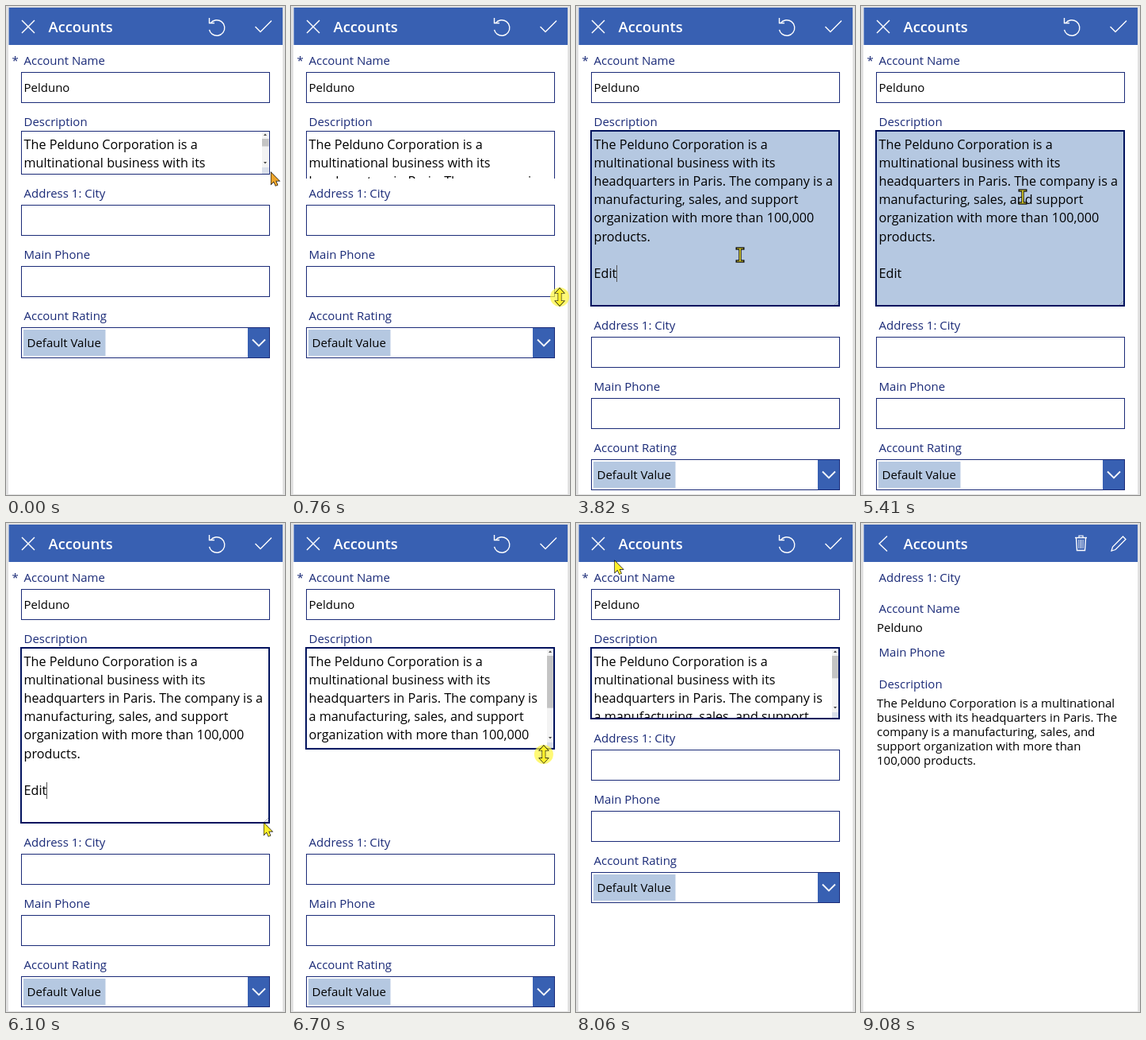
Write an HTML page with a canvas that moves like this. It is 352 by 615 pixels and loops after 9560 ms.

```html
<!DOCTYPE html>
<html lang="en">
<head>
<meta charset="utf-8">
<title>Account form</title>
<style>
  html, body { margin: 0; width: 100%; height: 100%; overflow: hidden; background: #fff; }
  canvas { display: block; }
</style>
</head>
<body>
<canvas id="stage" width="352" height="615"></canvas>
<script>
const g = document.getElementById('stage').getContext('2d');
const LOOP = 9560;
const FONT = '"Open Sans", "Noto Sans", sans-serif';
const BLUE = '#3860b2', NAVY = '#1b2b78', DEEP = '#02135e', PALE = '#b5c8e1', EDGE = '#e1e1e1';
const COMPANY = 'Pelduno';
const ABOUT = `The ${COMPANY} Corporation is a multinational business with its headquarters in Paris. ` +
  'The company is a manufacturing, sales, and support organization with more than 100,000 products.';
const EDIT_SIZE = 16.2, PITCH = 23.1, TOP = 157;

// Moments when the form changes state
const AT = { grow: 200, grown: 1090, focus: 1450, end: 1900, enter1: 2560, enter2: 3170,
  type: 3430, shrink: 6250, shrunk: 7000, relayout: 7180, press: 8200, view: 8400, move: 8730, gone: 9080 };

// Pointer path: time, x, y
const PATH = [
  [70, 334, 209], [200, 337, 210], [760, 339, 366], [1020, 339, 374], [1090, 339, 374],
  [1450, 245, 268], [1550, 245, 268], [1700, 225, 293], [1880, 207, 313], [4400, 207, 313],
  [4550, 204, 240], [5430, 204, 240], [5850, 325, 377], [6180, 325, 377], [6250, 326, 384],
  [6950, 316, 253], [7050, 316, 244], [7640, 316, 244], [8150, 25, 30], [8730, 25, 30],
  [8800, 62, 45], [9010, 293, 510], [9080, 340, 585]
];

const clamp = (v, lo, hi) => Math.min(hi, Math.max(lo, v));
const between = (t, a, b) => t >= a && t < b;

function pointerAt(t) {
  const i = PATH.findIndex(k => k[0] > t);
  if (i === 0) return PATH[0].slice(1);
  if (i < 0) return PATH[PATH.length - 1].slice(1);
  const [t0, x0, y0] = PATH[i - 1], [t1, x1, y1] = PATH[i];
  const u = (t - t0) / (t1 - t0), e = u * u * (3 - 2 * u);
  return [x0 + (x1 - x0) * e, y0 + (y1 - y0) * e];
}

function rect(x, y, w, h, color) {
  g.fillStyle = color;
  g.fillRect(x, y, w, h);
}

function line(points, color, width = 1.4, close = false) {
  g.beginPath();
  points.forEach(([x, y]) => g.lineTo(x, y));
  if (close) g.closePath();
  g.strokeStyle = color;
  g.lineWidth = width;
  g.stroke();
}

function outline(x, y, w, h, color, width) {
  g.strokeStyle = color;
  g.lineWidth = width;
  g.strokeRect(x + width / 2, y + width / 2, w - width, h - width);
}

function shape(points, fill) {
  line(points, '#000', 1.2, true);
  g.fillStyle = fill;
  g.fill();
}

function setFont(size, weight = 400) {
  g.font = `${weight} ${size}px ${FONT}`;
}

function text(str, x, y, color = '#000', size = 15, weight = 400) {
  setFont(size, weight);
  g.fillStyle = color;
  g.fillText(str, x, y);
}

const label = (str, y) => text(str, 22.5, y, NAVY);
const rowOffset = i => Math.round(i * PITCH);

function wrap(str, width, size) {
  setFont(size);
  const rows = [];
  for (const para of str.split('\n')) {
    let row = '';
    for (const word of para.split(' ')) {
      const next = row ? row + ' ' + word : word;
      if (row && g.measureText(next).width > width) {
        rows.push(row);
        row = word;
      } else row = next;
    }
    rows.push(row);
  }
  return rows;
}

const field = y => outline(19, y, 314, 39, NAVY, 1);

function frame() {
  rect(0, 0, 352, 615, EDGE);
  rect(3, 2, 346, 612, '#fff');
  rect(3.5, 2, 345.5, 47, BLUE);
  text('Accounts', 53.5, 32.5, '#fff', 18.4, 600);
}

function editIcons() {
  line([[20, 18], [36, 34]], '#fff');
  line([[36, 18], [20, 34]], '#fff');
  g.beginPath();
  g.arc(266, 27.5, 9.8, -2.5, 2.9);
  g.strokeStyle = '#fff';
  g.stroke();
  line([[256.5, 15], [256.5, 21.5], [263, 21.5]], '#fff');
  line([[314.5, 26], [321, 32.5], [335, 18.5]], '#fff');
}

function viewIcons() {
  line([[33, 16.5], [23, 26], [33, 35.5]], '#fff');
  line([[270, 18.5], [285, 18.5]], '#fff');
  line([[275, 18], [275, 16], [280, 16], [280, 18]], '#fff', 1.2);
  line([[271.5, 19], [272.5, 34.5], [282.5, 34.5], [283.5, 19]], '#fff');
  for (const x of [275, 277.5, 280]) line([[x, 21], [x, 32]], '#fff', 1);
  line([[316, 35], [317.5, 30], [330.5, 17], [334, 20.5], [321, 33.5]], '#fff', 1.3, true);
}

function scrollbar(bottom, ratio) {
  const track = bottom - 20 - 167;
  rect(323, 158, 8.5, bottom - 159, '#f3f3f3');
  rect(323, 167, 8.5, Math.max(8, track * ratio), '#c4c4c4');
  rect(323, bottom - 9, 8.5, 8, '#d9dfea');
  g.fillStyle = '#444';
  for (const [y, d] of [[162, -1], [bottom - 15, 1]]) {
    g.beginPath();
    g.moveTo(325, y - d);
    g.lineTo(329, y - d);
    g.lineTo(327, y + d * 1.5);
    g.fill();
  }
}

function typed(t) {
  if (t < AT.enter1) return '';
  if (t < AT.enter2) return '\n';
  return '\n\n' + 'Edit'.slice(0, t < AT.type ? 0 : Math.floor((t - AT.type) / 130) + 1);
}

// Blinking restarts at every click or key
function caretOn(t) {
  const keys = [AT.focus, AT.end, AT.enter1, AT.enter2, ...[0, 1, 2, 3].map(i => AT.type + 130 * i)];
  const last = keys.filter(k => k <= t).pop();
  return last !== undefined && Math.floor((t - last) / 530) % 2 === 0;
}

function boxBottom(t, y) {
  if (t < AT.grow) return 212;
  if (t < AT.grown) return Math.max(212, y + 2);
  if (t < AT.shrink) return 378;
  return t < AT.shrunk ? clamp(y - 6, 247, 378) : 247;
}

function description(t, bottom, hover) {
  const focus = t >= AT.focus;
  const limit = t < AT.grown ? 217 : 400;
  const height = bottom - TOP, str = ABOUT + typed(t);
  let rows = wrap(str, 306, EDIT_SIZE);
  const full = rows.length * PITCH + 6, bar = full > height;
  if (bar) rows = wrap(str, 295, EDIT_SIZE);

  g.save();
  g.beginPath();
  g.rect(17, 155, 318, limit - 155);
  g.clip();
  rect(19, TOP, 314, height, hover ? PALE : '#fff');

  g.save();
  g.beginPath();
  g.rect(20, TOP + 1, 311, height - 2);
  g.clip();
  rows.forEach((row, i) => text(row, 22.5, 180 + rowOffset(i), '#000', EDIT_SIZE));
  if (caretOn(t)) {
    let i = rows.length - 1, before = rows[i];
    if (t < AT.end) {
      i = 4;
      before = 'organization with more than ';
    }
    setFont(EDIT_SIZE);
    rect(Math.round(22.5 + g.measureText(before).width), 164 + rowOffset(i), 1, 21, '#555');
  }
  g.restore();

  if (bar) scrollbar(bottom, height / full);
  else {
    line([[326, bottom - 2], [331, bottom - 7]], '#8a93a8', .7);
    line([[329, bottom - 2], [331, bottom - 4]], '#8a93a8', .7);
  }
  if (focus) outline(18, TOP - 1, 315, height + 1, DEEP, 2);
  else outline(19, TOP, 314, height, NAVY, 1);
  g.restore();
}

function form(t, bottom, hover) {
  editIcons();
  text('*', 7.5, 74, NAVY);
  label('Account Name', 74);
  field(83);
  text(COMPANY, 22.5, 108);
  label('Description', 151);
  description(t, bottom, hover);

  const shift = t < AT.grown ? 0 : t < AT.relayout ? 166 : 35;
  g.save();
  g.translate(0, shift);
  label('Address 1: City', 241);
  field(250);
  label('Main Phone', 318);
  field(327);
  label('Account Rating', 395);
  field(404);
  rect(22, 407, 103.5, 33, PALE);
  text('Default Value', 26.5, 429.4);
  rect(305, 405, 27, 37, BLUE);
  line([[311, 419.5], [319, 427.5], [327, 419.5]], '#fff', 1.8);
  g.restore();

  rect(0, 614, 352, 1, EDGE);
}

function view() {
  viewIcons();
  label('Address 1: City', 74);
  label('Account Name', 113);
  text(COMPANY, 20, 137);
  label('Main Phone', 168);
  label('Description', 208);
  wrap(ABOUT, 310, 15).forEach((row, i) => text(row, 20, 232 + i * 18));
}

function halo(x, y) {
  g.beginPath();
  g.arc(x, y, 12, 0, 7);
  g.fillStyle = 'rgba(255, 246, 60, .7)';
  g.fill();
}

function arrow(color) {
  shape([[.5, .5], [.5, 15], [3.8, 11.8], [6.2, 17], [8.6, 16], [6.3, 10.8], [10.8, 10.8]], color);
}

function beam(color) {
  const bars = [[[-5.5, -8], [5.5, -8]], [[-5.5, 8], [5.5, 8]], [[0, -8], [0, 8]]];
  bars.forEach(b => line(b, '#111', 3.4));
  line(bars[2], color, 1.4);
  line([[-4, -8], [4, -8]], color, .8);
  line([[-4, 8], [4, 8]], color, .8);
}

function resizer() {
  const half = [[0, -11], [5.5, -5], [1.8, -5]];
  const right = [...half, ...half.slice().reverse().map(([x, y]) => [x, -y])];
  shape([...right, ...right.slice().reverse().map(([x, y]) => [-x, y])], '#fff02a');
}

function pointer(t, x, y, drag, hover) {
  if (t >= AT.gone) return;
  if (drag || between(t, AT.press, AT.move)) halo(x, y);
  const warm = t < AT.grow || between(t, AT.shrunk, 7400);
  const color = warm ? '#eea62c' : '#fff02a';
  g.save();
  g.translate(x, y);
  if (drag) resizer();
  else if (hover) beam(color);
  else arrow(color);
  g.restore();
}

function draw(t) {
  const [x, y] = pointerAt(t);
  const drag = between(t, AT.grow, AT.grown) || between(t, AT.shrink, AT.shrunk);
  const bottom = boxBottom(t, y);
  const hover = !drag && t < AT.view && between(x, 19, 324) && between(y, TOP, bottom);
  frame();
  if (t < AT.view) form(t, bottom, hover);
  else view();
  pointer(t, x, y, drag, hover);
}

const start = performance.now();
function tick() {
  draw((performance.now() - start) % LOOP);
  requestAnimationFrame(tick);
}
tick();
</script>
</body>
</html>
```
